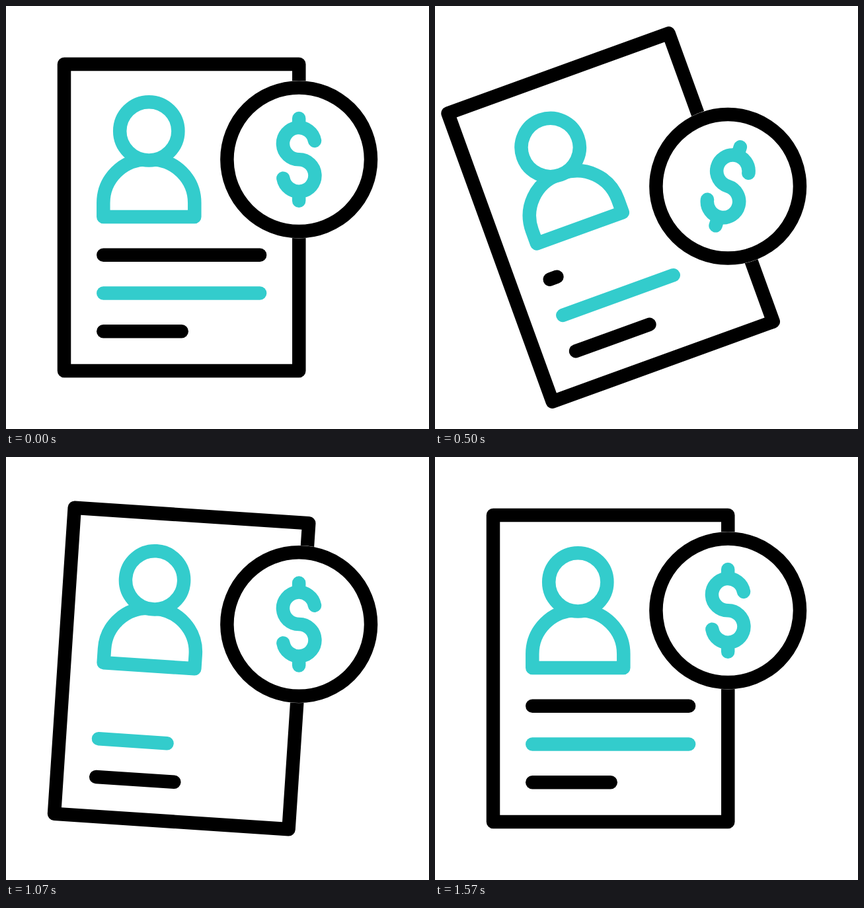
Write an HTML page that moves like this. It is 640 by 640 pixels and loops after 2 s.

```html
<!DOCTYPE html>
<html lang="en">
<head>
<meta charset="utf-8">
<title>Profile and payment</title>
<style>
  html, body { margin: 0; width: 100%; height: 100%; overflow: hidden; background: #fff; }
  svg { display: block; width: 100vw; height: 100vh; }
  .ink { stroke: #000; }
  .teal { stroke: #3cc; }
</style>
</head>
<body>
<svg viewBox="0 0 640 640" fill="none" stroke-width="20.5" stroke-linecap="round" stroke-linejoin="round">
  <g id="page">
    <rect class="ink" x="88" y="88" width="355.3" height="464"/>
    <path class="teal" d="M147.3 319V298A65.7 65.7 0 0 1 213 232.3H219.6A65.7 65.7 0 0 1 285.3 298V319Z"/>
    <circle class="teal" cx="216.3" cy="189.3" r="44.1" fill="#fff"/>
    <path id="line1" class="ink"/>
    <path id="line2" class="teal"/>
    <path class="ink" d="M147.3 492.2H265.7"/>
  </g>
  <g id="coin">
    <circle r="119.3" fill="#fff"/>
    <circle class="ink" r="108.8"/>
    <path id="dollar" class="teal" d="M23.8 -28.4A24.2 24.2 0 1 0 0 0A24.2 24.2 0 1 1 -23.8 28.4M0 -62.4V-48.4M0 48.4V62.4"/>
  </g>
</svg>
<script>
const LOOP = 2000, STEP = 1000 / 30, LAST = 47;
const el = id => document.getElementById(id);
const page = el('page'), coin = el('coin'), dollar = el('dollar');
const line1 = el('line1'), line2 = el('line2');

// Eased progress from 0 to 1 between steps a and b.
function ease(s, a, b) {
  const p = Math.min(1, Math.max(0, (s - a) / (b - a)));
  return p * p * (3 - 2 * p);
}

function setLine(line, y, amount) {
  line.setAttribute('d', amount > 0.001 ? `M147.3 ${y}h${236.8 * amount}` : '');
}

function draw(ms) {
  const s = Math.min(LAST, Math.floor((ms + 3.4) / STEP));
  const go = (a, b) => ease(s, a, b);

  const tilt = -20.3 * go(0, 16.3) + 29.3 * go(16.3, 27.2) - 14 * go(27.2, 38.8) + 5 * go(38.8, LAST);
  const drop = 48 * (go(0.3, 12.2) - go(12.2, 23.4)) + 24 * (go(23.4, 34.6) - go(34.6, LAST));
  const spin = 360 * (go(17.9, 28) - go(0, 17.3));

  page.setAttribute('transform', `rotate(${tilt} 265.6 320)`);
  coin.setAttribute('transform', `translate(443.2 ${232.3 + drop})`);
  dollar.setAttribute('transform', `rotate(${spin})`);
  setLine(line1, 376.7, 1 - go(0, 17.3) + go(33.6, LAST));
  setLine(line2, 434.4, 1 - 0.926 * (go(9.8, 25.1) - go(27.2, 38.4)));
}

const start = performance.now();
function tick() {
  draw((performance.now() - start) % LOOP);
  requestAnimationFrame(tick);
}
tick();
</script>
</body>
</html>
```
